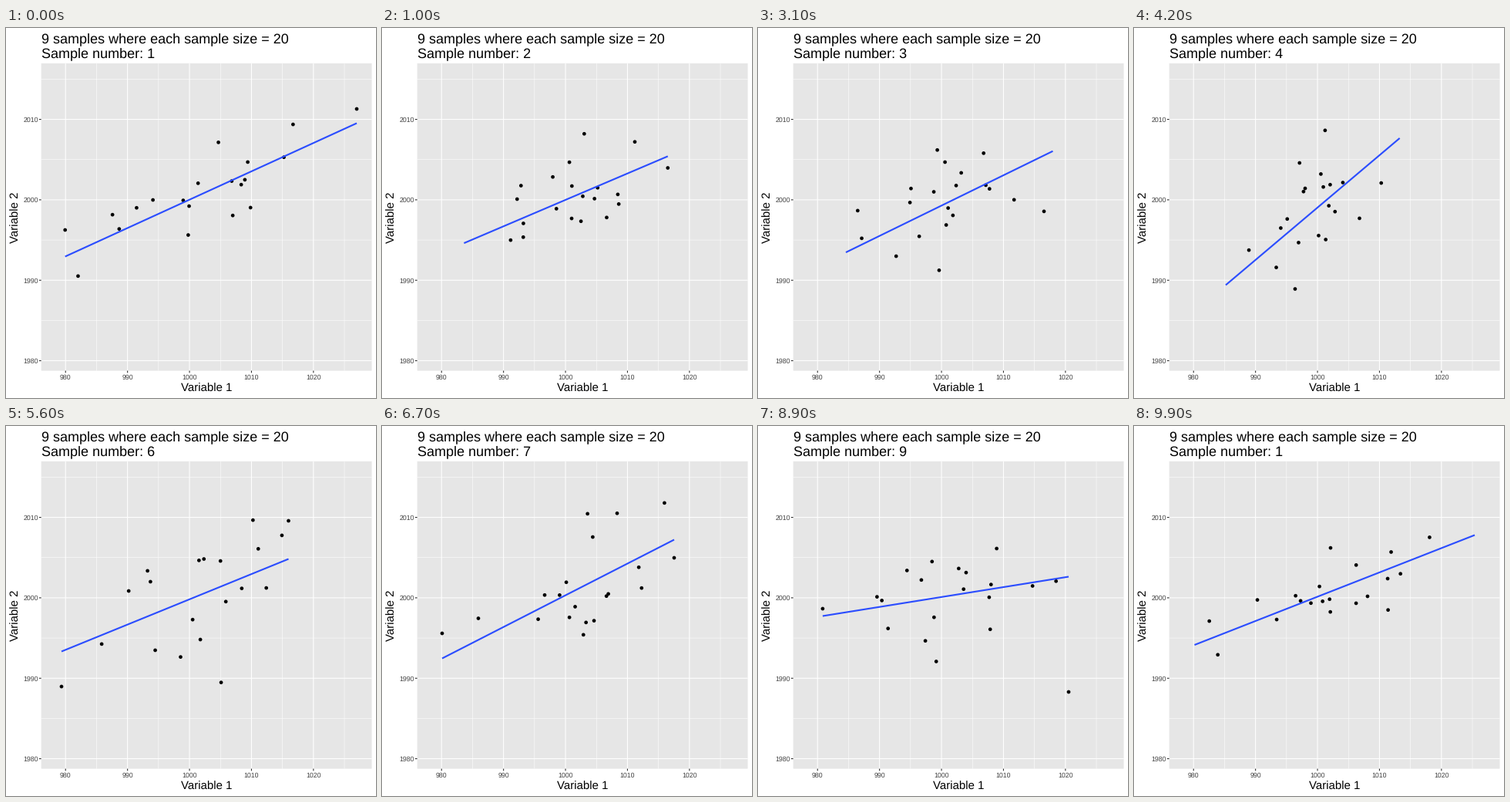
Recreate the animation shown at these times as a matplotlib script. Size 480 by 480 pixels, loop 10 s.

```python
import numpy as np
import matplotlib.pyplot as plt
from matplotlib.animation import FuncAnimation
from matplotlib.patches import Circle, Rectangle

SIZE, DPI = 480, 72
FRAMES, STEPS, COUNT = 100, 4, 20
LEFT, TOP, RIGHT, BOTTOM = 45.7, 45.8, 474.5, 444.6
MIDDLE = 238.05

plt.rcParams["font.family"] = "Liberation Sans"
plt.rcParams["text.hinting"] = "none"
rng = np.random.default_rng(12)

# Ends of each regression line, in stage pixels
fits = np.array([
    [(76.7, 296.5), (455, 123.5)],
    [(116.3, 273.3), (342.7, 180.7)],
    [(112, 276), (404.5, 160)],
    [(120, 336.3), (316.4, 158.9)],
    [(116, 325), (429.5, 95)],
    [(72, 292.5), (366.5, 172.5)],
    [(78, 301.5), (379, 147.5)],
    [(65.5, 337.5), (387.5, 146.5)],
    [(83.9, 246.5), (403, 195.5)]])
# Heights of the leftmost and rightmost dot of each sample
ends = [(262, 105), (231, 207), (218, 239), (280, 209), (286, 227),
        (338, 123), (269, 171), (416, 142), (237, 345)]
starts = [8] + [9 + 11 * k for k in range(1, 9)]


def make_sample(fit, end_y):
    """Random dots scattered about a line, spanning its full width."""
    (x0, y0), (x1, y1) = fit
    x = np.clip(rng.normal(MIDDLE, (x1 - x0) / 5, COUNT - 2), x0 + 3, x1 - 3)
    noise = rng.normal(0, 45, x.size)
    noise -= np.polyval(np.polyfit(x, noise, 1), x)
    y = np.clip(y0 + (y1 - y0) * (x - x0) / (x1 - x0) + noise, 64, 426)
    dots = np.column_stack([np.append(x, [x0, x1]), np.append(y, end_y)])
    return rng.permutation(dots)


samples = [make_sample(fit, end) for fit, end in zip(fits, ends)]

fig = plt.figure(figsize=(SIZE / DPI, SIZE / DPI), dpi=DPI, facecolor="white")
ax = fig.add_axes([0, 0, 1, 1])
ax.set(xlim=(0, SIZE), ylim=(SIZE, 0))
ax.axis("off")


def px(v):
    return MIDDLE + 8.04 * (v - 1000)


def py(v):
    return 222.9 - 10.435 * (v - 2000)


def rule(x, y, color, width):
    ax.plot(x, y, color=color, lw=width, zorder=1, snap=False,
            solid_capstyle="butt")


def label(x, y, text, size, color="black", **kw):
    return ax.text(x, y, text, fontsize=size, color=color,
                   va="baseline", **kw)


ax.add_patch(Rectangle((LEFT, TOP), RIGHT - LEFT, BOTTOM - TOP,
                       fc="#E6E6E6", ec="none", zorder=0, snap=False))
for v in range(980, 1030, 5):
    major = v % 10 == 0
    rule([px(v)] * 2, [TOP, BOTTOM], "white", 1.07 if major else 0.53)
    if major:
        rule([px(v)] * 2, [BOTTOM, BOTTOM + 2.75], "#2B2B2B", 1.07)
        label(px(v), 456, str(v), 8.8, "#404040", ha="center")
for v in range(1980, 2020, 5):
    major = v % 10 == 0
    rule([LEFT, RIGHT], [py(v)] * 2, "white", 1.07 if major else 0.53)
    if major:
        rule([LEFT - 2.75, LEFT], [py(v)] * 2, "#2B2B2B", 1.07)
        label(41.7, py(v) + 3.2, str(v), 8.8, "#404040", ha="right")

label(45.7, 19, "9 samples where each sample size = 20", 18)
caption = label(45.7, 38, "", 18)
label(260, 472, "Variable 1", 15, ha="center")
label(16.7, 245.5, "Variable 2", 15, ha="center",
      rotation=90, rotation_mode="anchor")

dots = [ax.add_patch(Circle((0, 0), 2.35, fc="black", ec="none", zorder=2))
        for _ in range(COUNT)]
line, = ax.plot([], [], color="#2B4DFF", lw=2.13, zorder=3,
                solid_capstyle="butt")


def draw(frame):
    k = sum(s <= frame for s in starts) - 1
    t = min(((frame - starts[k]) % FRAMES + 1) / STEPS, 1)
    a, b = k % 9, (k + 1) % 9
    for dot, xy in zip(dots, (1 - t) * samples[a] + t * samples[b]):
        dot.center = xy
    line.set_data(*((1 - t) * fits[a] + t * fits[b]).T)
    caption.set_text(f"Sample number: {(b if t >= 0.5 else a) + 1}")
    return [*dots, line, caption]


anim = FuncAnimation(fig, draw, frames=FRAMES, interval=100,
                     repeat=True, repeat_delay=0)
plt.show()
```
